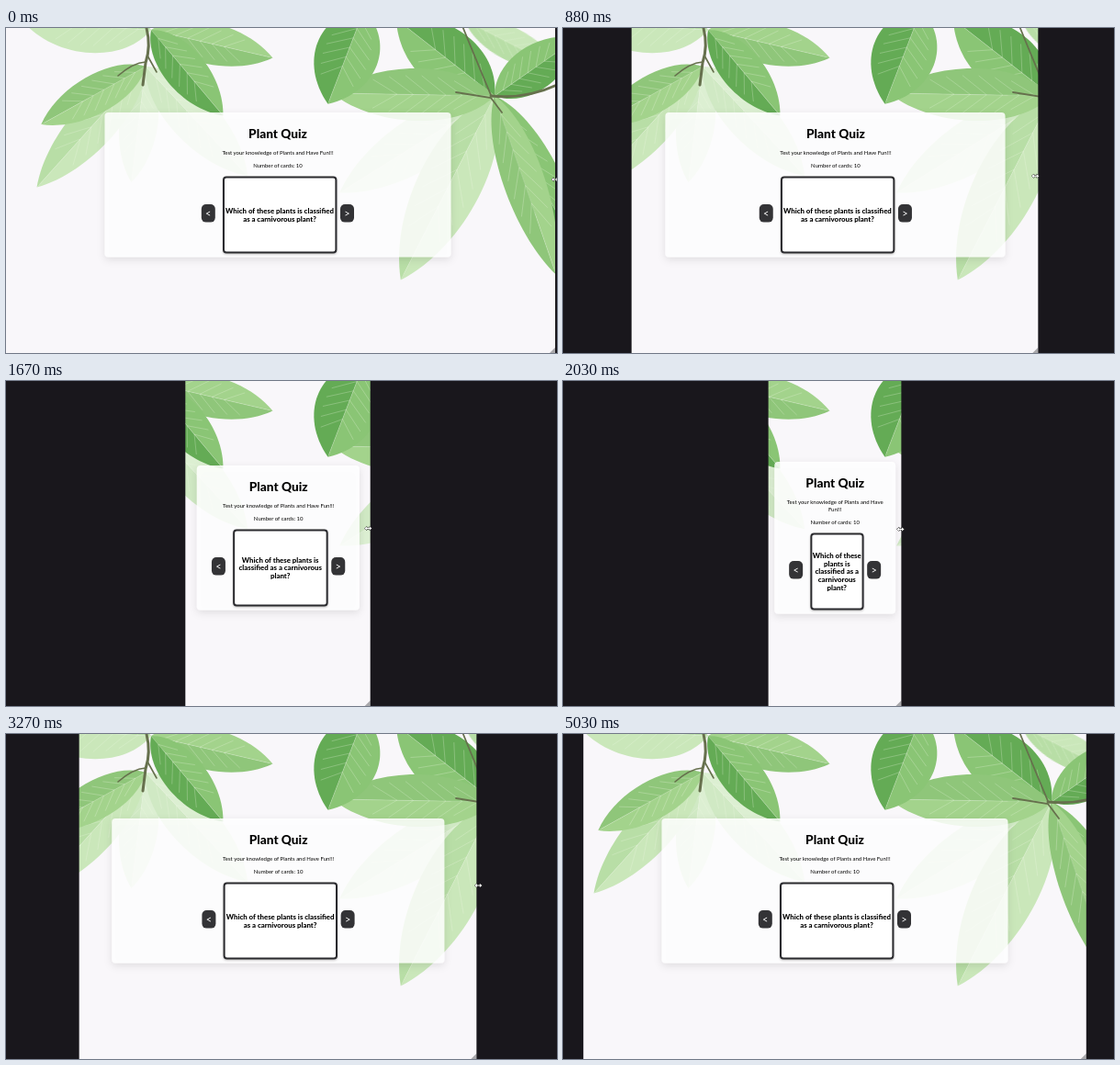
Recreate the animation shown at these times as an HTML page. Size 600 by 354 pixels, loop 5730 ms.

```html
<!DOCTYPE html>
<html lang="en">
<head>
<meta charset="utf-8">
<title>Plant Quiz</title>
<style>
html, body { margin: 0; width: 100%; height: 100%; overflow: hidden; background: #19171c; }
svg { display: block; width: 600px; height: 354px; }
text { font-family: Lato, "Open Sans", sans-serif; text-anchor: middle; }
.head { font-size: 13.7px; font-weight: 800; }
.small { font-size: 6px; }
.ask { font-size: 7.85px; font-weight: 800; }
.key { fill: #fff; font-size: 11px; }
</style>
</head>
<body>
<svg id="stage" viewBox="0 0 600 354">
  <defs>
    <filter id="photo"><feGaussianBlur stdDeviation=".4"/></filter>
    <filter id="soft" x="-10%" y="-15%" width="120%" height="135%">
      <feDropShadow dx="0" dy="3" stdDeviation="4" flood-color="#000" flood-opacity=".12"/>
    </filter>
    <filter id="near" x="-10%" y="-10%" width="120%" height="125%">
      <feDropShadow dx="0" dy="1" stdDeviation="1" flood-color="#000" flood-opacity=".25"/>
    </filter>
  </defs>
  <rect width="600" height="354" fill="#f9f7fa"/>
  <g id="plant" filter="url(#photo)"></g>
  <rect id="panel" rx="4" fill="#fff" fill-opacity=".84" filter="url(#soft)"/>
  <g id="content">
    <text class="head" id="title">Plant Quiz</text>
    <text class="small" id="sub"></text>
    <text class="small" id="count">Number of cards: 10</text>
    <rect id="card" rx="3" height="82" fill="#fff" stroke="#2b2b2e" stroke-width="2" filter="url(#near)"/>
    <text class="ask" id="ask"></text>
    <g id="prev"><rect x="-7.5" y="-10" width="15" height="19.6" rx="5" fill="#333336"/><text class="key" y="4">&lt;</text></g>
    <g id="next"><rect x="-7.5" y="-10" width="15" height="19.6" rx="5" fill="#333336"/><text class="key" y="4">&gt;</text></g>
  </g>
  <path id="grip" d="M0 354h-6l6-6z" fill="#a9a8ab"/>
  <rect id="barL" height="354" fill="#19171c"/>
  <rect id="barR" height="354" fill="#19171c"/>
  <path id="cursor" d="M-4 0l2.5-2v1.5h3V-2L4 0 1.5 2V.5h-3V2z" fill="#fff" stroke="#222" stroke-width=".9" paint-order="stroke"/>
</svg>
<script>
const LOOP = 5730, MID = 296;
const $ = id => document.getElementById(id);
const set = (id, attrs) => { for (const k in attrs) $(id).setAttribute(k, attrs[k]); };
const clamp = (v, lo, hi) => Math.min(hi, Math.max(lo, v));

// Each spray grows from one node; leaf: angle, length, bulge, tone
const SPRAYS = [
  { x: 152, y: 42, leaves: [[97, 127, 28, 0], [47, 163, 34, 0], [132, 177, 32, 1], [151, 130, 28, 2]] },
  { x: 158, y: 2, leaves: [[183, 138, 38, 1], [13, 136, 30, 2], [50, 122, 30, 3]] },
  { x: 500, y: -8, leaves: [[27, 120, 24, 1]] },
  { x: 532, y: 74, leaves: [[148, 199, 38, 0], [117, 225, 46, 1], [62, 200, 32, 3], [71, 206, 30, 2],
                            [-35, 110, 32, 3], [218, 136, 44, 3], [181, 177, 38, 2]] },
  { x: 390, y: -20, leaves: [[111, 110, 46, 3]] }
];
const TONES = [["#dcefd2", "#d0e9c4"], ["#cae7ba", "#b8dea6"], ["#a3d38c", "#8fc67a"], ["#8ac575", "#64ab55"]];

function leaf([angle, len, bulge, tone]) {
  const half = (w, fill) => `<path d="M0 0C${len * .2} ${w} ${len * .72} ${w} ${len} 0Z" fill="${fill}"/>`;
  let veins = `M0 0H${len * .97}`;
  for (let p = .1; p < .7; p += .1) {
    const q = p + .15, w = bulge * 2.2 * q * (1 - q);
    veins += `M${len * q} ${w}L${len * p} 0L${len * q} ${-w}`;
  }
  return `<g transform="rotate(${angle})">${half(-bulge, TONES[tone][0])}${half(bulge, TONES[tone][1])}` +
    `<path d="${veins}" fill="none" stroke="#eef8e4" stroke-opacity=".35" stroke-width=".7"/></g>`;
}
const spray = s => `<g transform="translate(${s.x} ${s.y})">${s.leaves.map(leaf).join("")}</g>`;
const twig = (d, w) => `<path d="${d}" fill="none" stroke="#66704d" stroke-width="${w}" stroke-linecap="round"/>`;
$("plant").innerHTML = SPRAYS.map(spray).join("") +
  twig("M153 0Q158 20 152 38L149 62", 3) + twig("M152 37Q138 38 122 52M154 30L164 48", 1.6) +
  twig("M497 -2Q510 30 528 73M490 70L528 76L540 92", 1.8) + twig("M528 74Q565 78 600 62", 3);

// The left window edge is dragged inwards, rests, then is pulled out again
const DRAGS = [
  { from: 0, to: 2200, a: -6, b: 227, ease: p => (1 - Math.cos(Math.PI * p)) / 2 },
  { from: 2520, to: 3100, a: 227, b: 98, ease: p => p ** 1.27 },
  { from: 3100, to: 4240, a: 98, b: 20, ease: p => 1 - (1 - p) ** 1.65 },
  { from: 4300, to: 4850, a: 20, b: 22.2, ease: p => p }
];
function edge(t) {
  const d = DRAGS.filter(d => d.from <= Math.max(0, t)).pop();
  return d.a + (d.b - d.a) * d.ease(clamp((t - d.from) / (d.to - d.from), 0, 1));
}

const pen = document.createElement("canvas").getContext("2d");
function wrap(text, font, limit) {
  pen.font = font;
  const lines = [];
  for (const word of text.split(" ")) {
    const last = lines.length - 1, joined = lines[last] + " " + word;
    if (last >= 0 && pen.measureText(joined).width <= limit) lines[last] = joined;
    else lines.push(word);
  }
  return lines;
}
function place(id, lines, x, y, lead) {
  $(id).innerHTML = lines.map((s, i) => `<tspan x="${x}" y="${y + i * lead}">${s}</tspan>`).join("");
}

function draw(t) {
  const left = edge(t), right = 2 * MID - left;
  const speed = (left - edge(t - 30)) / 30;
  const inner = .8 * (right - left);
  const panel = Math.min(377, inner + 16), card = Math.min(124, inner - 58);
  const cx = MID + 2;

  // fonts are measured at ten times their size
  const sub = wrap("Test your knowledge of Plants and Have Fun!!!", "60px Lato, sans-serif", inner * 10);
  const ask = wrap("Which of these plants is classified as a carnivorous plant?", "800 78.5px Lato, sans-serif", (card - 3) * 10);
  const grow = (sub.length - 1) * 4;

  place("sub", sub, MID, 137.6 - grow, 8);
  place("ask", ask, cx, 206.4 + grow - (ask.length - 1) * 4.3, 8.6);
  const shift = Math.abs(speed) * 6;
  set("panel", { x: MID - panel / 2 + shift / 2, y: 92 - grow, width: panel, height: 157.5 + 2 * grow });
  set("content", { transform: `translate(${shift} 0)` });
  set("title", { x: MID, y: 120.3 - grow });
  set("count", { x: MID, y: 151.8 + grow });
  set("card", { x: cx - card / 2 + 1, y: 162.6 + grow, width: card - 1.6 });
  set("prev", { transform: `translate(${cx - card / 2 - 15.7} ${202 + grow})` });
  set("next", { transform: `translate(${cx + card / 2 + 11.5} ${202 + grow})` });

  set("grip", { transform: `translate(${right} 0)` });
  set("barL", { width: Math.max(0, left) });
  set("barR", { x: right, width: Math.max(0, 600 - right) });
  const lag = clamp(-speed * 20, -3, 4), dip = 4.6 * Math.sin(Math.PI * Math.min(1, t / 2850));
  set("cursor", { transform: `translate(${right + lag} ${165 - dip})`, visibility: t < 4850 ? "visible" : "hidden" });
}

const start = performance.now();
function tick(now) {
  draw(Math.max(0, now - start) % LOOP);
  requestAnimationFrame(tick);
}
draw(0);
requestAnimationFrame(tick);
</script>
</body>
</html>
```
